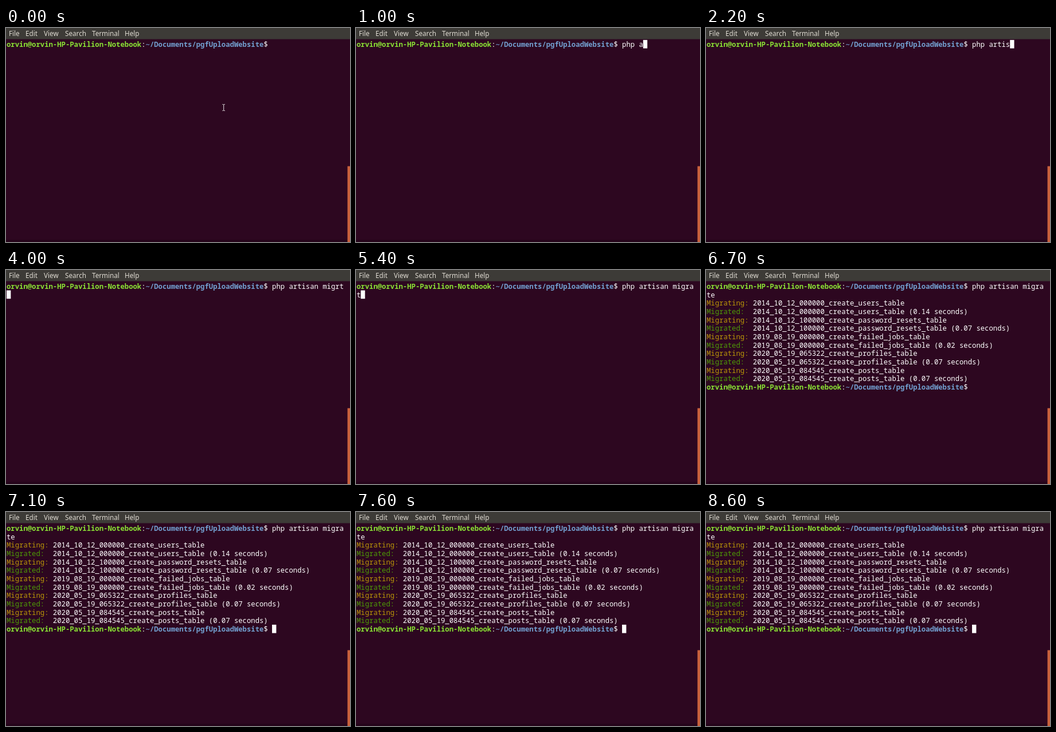
These frames come from a looping animation (600 by 374 pixels, 8700 ms). An HTML page:

```html
<!DOCTYPE html>
<html lang="en">
<head>
<meta charset="utf-8">
<title>Terminal</title>
<style>
  html, body { margin: 0; width: 100%; height: 100%; overflow: hidden; background: #2d0720; }
  svg { display: block; width: 100vw; height: 100vh; }
  text { white-space: pre; }
  .menu { font: 11.7px "Noto Sans", "Open Sans", sans-serif; fill: #dfdbd2; }
  .term { font: 500 12.25px "Noto Sans Mono", "DejaVu Sans Mono", monospace; fill: #fff; }
  .user { fill: #8ae234; font-weight: bold; }
  .path { fill: #729fcf; font-weight: bold; }
  .doing { fill: #b99608; }
  .done { fill: #4e9a06; }
</style>
</head>
<body>
<svg viewBox="0 0 600 374">
  <rect width="600" height="374" fill="#2d0720"/>
  <rect y="370" width="600" height="4" fill="#25041a"/>
  <rect width="600" height="19.5" fill="#3d3b37"/>
  <rect x="595.6" y="241.5" width="4.4" height="132.5" fill="#c9613c"/>
  <g id="menu" class="menu"></g>
  <g id="rows" class="term"></g>
  <rect id="cursor" width="7.35" height="14.67" fill="#fff"/>
  <path id="pointer" d="M377.5 133.5h1.5l.7.7.7-.7h1.5M379.7 134v10M377.5 144.5h1.5l.7-.7.7.7h1.5" fill="none" stroke="#e8e4e6"/>
</svg>
<script>
const LOOP = 8700, COLS = 80, CHAR_W = 7.35, ROW_H = 14.67, LEFT = 1, TOP = 20.9, BASELINE = 12.1;
const PROMPT_COLS = 63, COMMAND = "php artisan migrate";
const $ = id => document.getElementById(id);

// [time, typed text]
const keys = [[0, ""]];
const type = (from, times) => times.forEach((t, i) => keys.push([t, COMMAND.slice(0, from + i + 1)]));
type(0, [300, 500, 700, 800, 1000, 1600, 1800, 1900, 2100, 2400, 2500, 2700, 2800, 3100, 3500, 3700]);
keys.push([3900, "php artisan migrt"], [4400, "php artisan migr"]);
type(16, [5200, 5400, 5600]);

// [time, output lines shown]
const ENTER = 5900, PROMPT_AT = 6700;
const output = [[ENTER, 0], [6000, 1], [6200, 3], [6300, 5], [6400, 7], [6500, 9], [6600, 10]];
const blinkOff = [[0, 300], [4900, 5200], [6500, 7100], [7700, 8300]];

const span = (cls, text) => `<tspan class="${cls}">${text}</tspan>`;
const prompt = span("user", "orvin@orvin-HP-Pavilion-Notebook") + ":" +
  span("path", "~/Documents/pgfUploadWebsite") + "$ ";

const log = [
  ["2014_10_12_000000_create_users_table", "0.14"],
  ["2014_10_12_100000_create_password_resets_table", "0.07"],
  ["2019_08_19_000000_create_failed_jobs_table", "0.02"],
  ["2020_05_19_065322_create_profiles_table", "0.07"],
  ["2020_05_19_084545_create_posts_table", "0.07"]
].flatMap(([name, secs]) => [
  span("doing", "Migrating:") + " " + name,
  span("done", "Migrated: ") + ` ${name} (${secs} seconds)`
]);

const latest = (list, t) => list.reduce((last, item) => item[0] <= t ? item : last)[1];

$("menu").innerHTML = [["File", 5], ["Edit", 34], ["View", 66], ["Search", 103], ["Terminal", 150], ["Help", 207]]
  .map(([label, x]) => `<text x="${x}" y="14.2">${label}</text>`).join("");

let shown = "";
function render(t) {
  const typed = latest(keys, t), room = COLS - PROMPT_COLS;
  const lines = [prompt + typed.slice(0, room), typed.slice(room)];
  const pos = PROMPT_COLS + typed.length;
  let row = Math.floor(pos / COLS), col = pos % COLS;

  if (t >= ENTER) {
    lines.push(...log.slice(0, latest(output, t)));
    row = lines.length;
    col = 0;
    if (t >= PROMPT_AT) {
      lines.push(prompt);
      col = PROMPT_COLS;
    }
  }

  const html = lines.map((line, i) =>
    `<text x="${LEFT}" y="${(TOP + BASELINE + i * ROW_H).toFixed(2)}">${line}</text>`).join("");
  if (html !== shown) $("rows").innerHTML = shown = html;

  const hidden = blinkOff.some(([from, to]) => t >= from && t < to);
  $("cursor").setAttribute("x", LEFT + col * CHAR_W);
  $("cursor").setAttribute("y", TOP + row * ROW_H);
  $("cursor").setAttribute("visibility", hidden ? "hidden" : "visible");
  $("pointer").setAttribute("visibility", t < 300 ? "visible" : "hidden");
}

const start = performance.now();
function tick() {
  render((performance.now() - start) % LOOP);
  requestAnimationFrame(tick);
}
tick();
</script>
</body>
</html>
```
